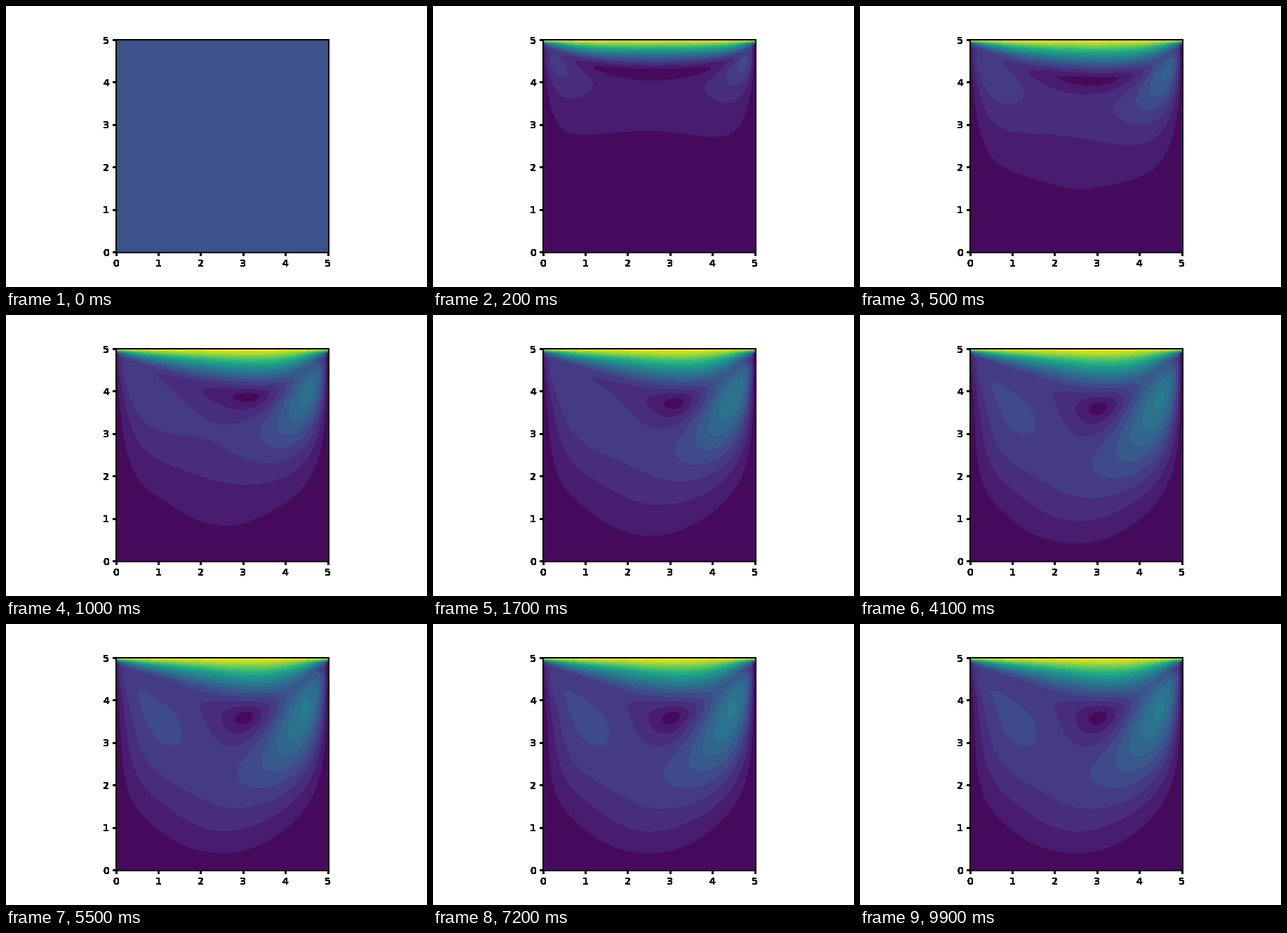
These frames come from a looping animation (600 px wide and 400 px high, 10 s). A matplotlib script:

```python
"""Speed field of a lid-driven cavity flow, developing from rest."""
import matplotlib.pyplot as plt
import numpy as np
from matplotlib.animation import FuncAnimation

SIDE, N = 5.0, 51
NU, DT = 0.05, 0.01
FRAMES, INTERVAL, STEPS = 100, 100, 100
H = SIDE / (N - 1)

MID = (slice(1, -1), slice(1, -1))
LEFT = (slice(1, -1), slice(None, -2))
RIGHT = (slice(1, -1), slice(2, None))
DOWN = (slice(None, -2), slice(1, -1))
UP = (slice(2, None), slice(1, -1))


def second_difference(first, last):
    """Eigen-decomposition of the 1D Laplacian with the given end entries."""
    n = N - 2
    m = np.eye(n, k=1) + np.eye(n, k=-1) - 2 * np.eye(n)
    m[0, 0], m[-1, -1] = first, last
    return np.linalg.eigh(m)


# Zero pressure slope on the three walls, zero pressure on the lid
LX, VX = second_difference(-1, -1)
LY, VY = second_difference(-1, -2)
INV = H**2 / (LY[:, None] + LX)


def ddx(f):
    return (f[RIGHT] - f[LEFT]) / (2 * H)


def ddy(f):
    return (f[UP] - f[DOWN]) / (2 * H)


def solve_pressure(u, v, p):
    ux, uy, vx, vy = ddx(u), ddy(u), ddx(v), ddy(v)
    b = (ux + vy) / DT - ux**2 - 2 * uy * vx - vy**2
    p[MID] = VY @ ((VY.T @ b @ VX) * INV) @ VX.T
    p[:, -1] = p[:, -2]
    p[0] = p[1]
    p[:, 0] = p[:, 1]
    p[-1] = 0


def advance(f, u, v, slope):
    """One explicit step for one velocity component."""
    c = f[MID]
    left, down = f[LEFT], f[DOWN]
    advection = (u[MID] * (c - left) + v[MID] * (c - down)) / H
    diffusion = NU * (f[RIGHT] + left + f[UP] + down - 4 * c) / H**2
    out = np.zeros_like(f)
    out[MID] = c + DT * (diffusion - advection - slope)
    return out


def simulate():
    u, v, p = np.zeros((3, N, N))
    fields = [np.hypot(u, v)]
    for _ in range(FRAMES - 1):
        for _ in range(STEPS):
            solve_pressure(u, v, p)
            u, v = advance(u, u, v, ddx(p)), advance(v, u, v, ddy(p))
            u[-1] = 1
        fields.append(np.hypot(u, v))
    return fields


def harden(img, dpi):
    """Turn every partly covered pixel solid black."""
    img = img.copy()
    img[(img[..., 3] > 0) & (img[..., 3] < 1)] = (0, 0, 0, 1)
    return img, 0, 0


fields = simulate()
grid = np.linspace(0, SIDE, N)

plt.rcParams["font.family"] = "DejaVu Sans"
fig, ax = plt.subplots(figsize=(6, 4), dpi=100, facecolor="white")
fig.subplots_adjust(left=0.125, right=0.9, bottom=0.125, top=0.88)
ax.set(xlim=(0, SIDE), ylim=(0, SIDE), aspect="equal",
       xticks=range(6), yticks=range(6))
ax.set_agg_filter(harden)
shown = []


def update(k):
    while shown:
        shown.pop().remove()
    # The field at rest has no range of its own, so it gets two plain bands
    levels = np.linspace(0, 1, 21) if k else [-1, 0, 1]
    shown.append(ax.contourf(grid, grid, fields[k], levels=levels,
                             cmap="viridis"))
    return shown


anim = FuncAnimation(fig, update, frames=FRAMES, interval=INTERVAL,
                     init_func=lambda: [], repeat=True, repeat_delay=0)
plt.show()
```
